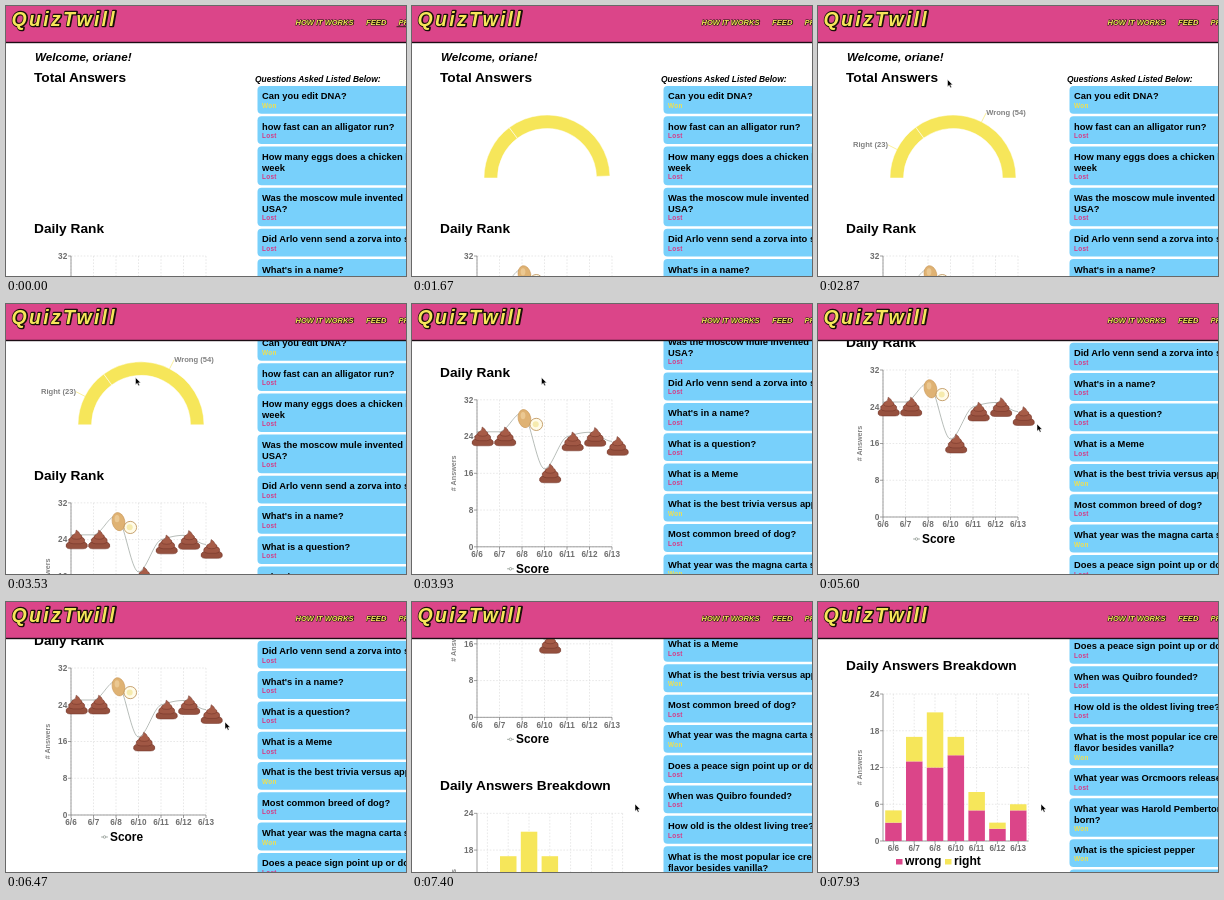
Recreate the animation shown at these times as an HTML page. Size 400 px wide and 270 px high, loop 8 s.

```html
<!DOCTYPE html>
<html lang="en">
<head>
<meta charset="utf-8">
<title>Quiz profile</title>
<style>
  html, body { margin: 0; width: 100%; height: 100%; overflow: hidden; background: #fff; }
  svg { display: block; width: 400px; height: 270px; }
  text { font-family: "Liberation Sans", Arial, sans-serif; font-weight: 700; white-space: pre; }
</style>
</head>
<body>
<svg id="stage" viewBox="0 0 400 270"></svg>
<script>
(() => {
const LOOP = 8000;
const PINK = '#db4589', YELLOW = '#f6e65a', BLUE = '#78d0fb', GRAY = '#707070';
const LINE_DONE = 1470, PIE_START = 370, PIE_TIME = 1500;

const stage = document.getElementById('stage');

function el(parent, tag, attrs = {}, text) {
  const node = document.createElementNS('http://www.w3.org/2000/svg', tag);
  for (const k in attrs) node.setAttribute(k, attrs[k]);
  if (text !== undefined) node.textContent = text;
  return parent.appendChild(node);
}
const label = (parent, x, y, size, text, attrs = {}) =>
  el(parent, 'text', { x, y, 'font-size': size, ...attrs }, text);
const show = (node, on) => node.setAttribute('visibility', on ? 'visible' : 'hidden');

// Monotone cubic through [x, y] keys, held flat at both ends
function track(keys) {
  const d = keys.slice(1).map((k, i) => (k[1] - keys[i][1]) / (k[0] - keys[i][0]));
  const m = keys.map((_, i) => {
    const a = d[i - 1], b = d[i];
    return a * b > 0 ? 2 * a * b / (a + b) : 0;
  });
  return x => {
    if (x <= keys[0][0]) return keys[0][1];
    for (let i = 0; i < d.length; i++) {
      const [x0, y0] = keys[i], [x1, y1] = keys[i + 1];
      if (x > x1) continue;
      const h = x1 - x0, u = (x - x0) / h, v = 1 - u;
      return y0 * (1 + 2 * u) * v * v + y1 * u * u * (3 - 2 * u)
        + h * (m[i] * u * v * v - m[i + 1] * u * u * v);
    }
    return keys[keys.length - 1][1];
  };
}

// CSS "ease" curve
function ease(x) {
  if (x <= 0) return 0;
  if (x >= 1) return 1;
  const bez = (s, a, b) => 3 * a * s * (1 - s) ** 2 + 3 * b * s * s * (1 - s) + s ** 3;
  let lo = 0, hi = 1;
  for (let i = 0; i < 24; i++) {
    const half = (lo + hi) / 2;
    if (bez(half, .25, .25) < x) lo = half; else hi = half;
  }
  return bez(lo, .1, 1);
}

const page = el(stage, 'g');

// Headings
label(page, 29, 55.2, 11.7, 'Welcome, oriane!', { 'font-style': 'italic' });
label(page, 28, 76, 13.7, 'Total Answers');
label(page, 28, 227, 13.7, 'Daily Rank');
label(page, 28, 469.3, 13.7, 'Daily Answers Breakdown');
label(page, 249, 75.6, 8.43, 'Questions Asked Listed Below:', { 'font-style': 'italic' });

// Question cards: text lines, then whether it was won
const cards = [
  ['Can you edit DNA?', 1],
  ['how fast can an alligator run?', 0],
  ['How many eggs does a chicken lay a|week', 0],
  ['Was the moscow mule invented in the|USA?', 0],
  ['Did Arlo venn send a zorva into space?', 0],
  ["What's in a name?", 0],
  ['What is a question?', 0],
  ['What is a Meme', 0],
  ['What is the best trivia versus app?', 1],
  ['Most common breed of dog?', 0],
  ['What year was the magna carta signed?', 1],
  ['Does a peace sign point up or down?', 0],
  ['When was Quibro founded?', 0],
  ['How old is the oldest living tree?', 0],
  ['What is the most popular ice cream|flavor besides vanilla?', 1],
  ['What year was Orcmoors released?', 0],
  ['What year was Harold Pemberton|born?', 1],
  ['What is the spiciest pepper', 1],
  ['', 0]
];
let cardY = 80;
for (const [text, won] of cards) {
  const lines = text.split('|'), extra = (lines.length - 1) * 10.8;
  el(page, 'rect', { x: 251.5, y: cardY, width: 170, height: 27.8 + extra, rx: 4, fill: BLUE });
  lines.forEach((s, i) => label(page, 256, cardY + 13.4 + i * 11, 9.35, s));
  label(page, 256, cardY + 21.9 + extra, 6.4, won ? 'Won' : 'Lost',
    { fill: won ? '#f2e04e' : '#d63a85', 'letter-spacing': .3 });
  cardY += 30.3 + extra;
}

// Half-ring of right and wrong answers
const CX = 135, CY = 172, R_IN = 49.5, R_OUT = 63;
const polar = (r, deg) => {
  const a = deg * Math.PI / 180;
  return [CX + r * Math.cos(a), CY - r * Math.sin(a)];
};
function sector(from, to) {
  const [a, b, c, d] = [polar(R_OUT, from), polar(R_OUT, to), polar(R_IN, to), polar(R_IN, from)];
  return `M${a}A${R_OUT} ${R_OUT} 0 0 1 ${b}L${c}A${R_IN} ${R_IN} 0 0 0 ${d}Z`;
}
const slices = [23, 54].map(n => ({
  sweep: n / 77 * 180,
  node: el(page, 'path', { fill: YELLOW, stroke: '#fff', 'stroke-width': .5 })
}));
const pieLabels = el(page, 'g');
[[153, 'Right (23)', 'end'], [63, 'Wrong (54)', 'start']].forEach(([deg, text, anchor]) => {
  const [x0, y0] = polar(R_OUT, deg), [x, y] = polar(73, deg);
  el(pieLabels, 'path', { d: `M${x0} ${y0}L${x} ${y}`, stroke: YELLOW, 'stroke-width': .6 });
  label(pieLabels, x, y + 2.2, 7.6, text, { fill: '#808080', 'text-anchor': anchor });
});

// Axes shared by both charts
const AXIS = 65, TALL = 147;
function axes(y, max, end, grid, ticks) {
  const dash = { stroke: '#d8d8d8', 'stroke-width': .6, 'stroke-dasharray': '1.6 1.6', fill: 'none' };
  const solid = { stroke: '#777', 'stroke-width': .7, fill: 'none' };
  const bottom = y + TALL;
  for (const x of grid) el(page, 'path', { d: `M${x} ${y}V${bottom}`, ...dash });
  for (let i = 0; i < 5; i++) {
    const ty = y + i * TALL / 4;
    el(page, 'path', { d: `M${AXIS} ${ty}H${end}`, ...dash });
    el(page, 'path', { d: `M${AXIS - 3} ${ty}H${AXIS}`, ...solid });
    label(page, 61.3, ty + 2.9, 8.3, max * (4 - i) / 4, { fill: GRAY, 'text-anchor': 'end' });
  }
  ['6/6', '6/7', '6/8', '6/10', '6/11', '6/12', '6/13'].forEach((s, i) => {
    el(page, 'path', { d: `M${ticks[i]} ${bottom}v3`, ...solid });
    label(page, ticks[i], bottom + 10.2, 8.2, s, { fill: GRAY, 'text-anchor': 'middle' });
  });
  el(page, 'path', { d: `M${AXIS} ${y}V${bottom}H${end}`, ...solid });
  label(page, 0, 0, 7.2, '# Answers', {
    fill: '#858585', 'text-anchor': 'middle',
    transform: `translate(43.5 ${y + TALL / 2}) rotate(-90)`
  });
}

// Daily rank line
const days = [...Array(7).keys()];
const dayX = days.map(i => AXIS + i * 22.5);
axes(250, 32, 200, dayX, dayX);
const rank = [282, 282, 263, 319, 287, 282.5, 291.5];
const rankAt = track(rank.map((y, i) => [dayX[i], y]));
let curve = '';
for (let x = AXIS; x <= 200; x++) curve += `${curve ? 'L' : 'M'}${x} ${rankAt(x).toFixed(2)}`;
const line = el(page, 'path', {
  d: curve, fill: 'none', stroke: '#87918a', 'stroke-width': .6, pathLength: 1
});

const marks = el(page, 'g');
function pile(x, y) {
  const g = el(marks, 'g', { transform: `translate(${x} ${y})` });
  const tier = (d, fill) => el(g, 'path', { d, fill, stroke: '#6f3025', 'stroke-width': .5 });
  tier('M-8 2.5Q-11.5 4-10.5 7.5Q-9.5 9.5-6 9.3H6Q9.5 9.5 10.5 7.5Q11.5 4 8 2.5Z', '#95503e');
  tier('M-5-2.5Q-8.5-1-8 1.8Q-7 4.3-3.5 4.2H4Q7.5 4 8 1.8Q8.5-1 5-2.5Z', '#a05744');
  tier('M-.5-9.5Q2.5-8 3.5-5Q6-4 5-1.8Q3.5-.3 0-.3Q-4-.3-5-1.8Q-5.8-4-3-5Q-.5-6-.5-9.5Z', '#a75c47');
}
function egg(x, y) {
  const g = el(marks, 'g', { transform: `translate(${x} ${y})` });
  el(g, 'ellipse', { rx: 6.3, ry: 9.2, fill: '#dfb273', stroke: '#c99755', 'stroke-width': .6, transform: 'rotate(-12)' });
  el(g, 'ellipse', { cx: -1.5, cy: -3, rx: 2.4, ry: 3.6, fill: '#ebc892' });
  el(g, 'ellipse', { cx: 11.8, cy: 5.8, rx: 6.3, ry: 6.1, fill: '#fffbe8', stroke: '#b98c50', 'stroke-width': .8 });
  el(g, 'circle', { cx: 11.2, cy: 5.6, r: 3, fill: '#f6ebae' });
}
rank.forEach((y, i) => i === 2 ? egg(112.5, 268.8) : pile(dayX[i] + 5.7, y + 4.7));

el(page, 'path', { d: 'M95 419H102', stroke: '#87918a', 'stroke-width': .7 });
el(page, 'circle', { cx: 98.5, cy: 419, r: 1.3, fill: '#fff', stroke: '#87918a', 'stroke-width': .7 });
label(page, 104, 422.8, 11.9, 'Score');

// Stacked daily bars: wrong below, right above
const BAND = 20.8, UNIT = TALL / 24;
const mid = days.map(i => AXIS + (i + .5) * BAND);
axes(493, 24, 210.6, [...mid, 210.6], mid);
const wrong = [3, 13, 12, 14, 5, 2, 5], right = [2, 4, 9, 3, 3, 1, 1];
days.forEach(i => {
  const bar = (from, n, fill) => el(page, 'rect', {
    x: mid[i] - 8.2, y: 640 - (from + n) * UNIT, width: 16.5, height: n * UNIT, fill
  });
  bar(0, wrong[i], PINK);
  bar(wrong[i], right[i], YELLOW);
});
[[78, 'wrong', PINK], [127, 'right', YELLOW]].forEach(([x, text, fill]) => {
  el(page, 'rect', { x, y: 658, width: 6.5, height: 5.5, fill });
  label(page, x + 9, 664, 12.1, text);
});

// Fixed header
el(stage, 'rect', { width: 400, height: 36, fill: PINK });
el(stage, 'rect', { y: 35.8, width: 400, height: 1.4, fill: '#1c0d14' });
const inked = (x, y, size, text, ink, gap) => {
  const base = { 'font-style': 'italic', 'letter-spacing': gap };
  label(stage, x + ink * .25, y + ink * .25, size, text,
    { ...base, fill: '#1a1208', stroke: '#1a1208', 'stroke-width': ink, 'stroke-linejoin': 'round' });
  label(stage, x, y, size, text, { ...base, fill: YELLOW });
};
inked(5.5, 19.8, 19.5, 'QuizTwill', 2.4, 2.3);
inked(289.5, 19, 7.5, 'HOW IT WORKS', 1.1, 0);
inked(360, 19, 7.7, 'FEED', 1.1, 0);
inked(392.5, 19, 7.6, 'PROFILE', 1.1, 0);
const underline = el(stage, 'rect', { x: 390.5, y: 20.2, width: 10, height: 1, fill: '#3a1f1a' });

const pointer = el(stage, 'path', {
  d: 'M0 0V7.2L1.7 5.7L2.9 8.3L4.1 7.8L3 5.3H5.2Z',
  fill: '#000', stroke: '#fff', 'stroke-width': .5
});

const scrollAt = track([[3050, 0], [3530, 51], [4050, 172], [4330, 183], [4650, 184],
  [6650, 184], [7400, 281.5], [7930, 401]]);
const pointX = track([[1950, 405], [2600, 129.5], [4450, 129.5], [5270, 208], [5420, 219], [6500, 219], [7100, 223]]);
const pointY = track([[1950, 20], [2600, 73.5], [4450, 73.5], [5270, 112], [5420, 120], [6500, 120], [7100, 202]]);

function draw(t) {
  page.setAttribute('transform', `translate(0 ${-scrollAt(t)})`);

  const grown = ease((t - PIE_START) / PIE_TIME);
  let angle = 180;
  for (const { sweep, node } of slices) {
    const end = angle - sweep * grown;
    node.setAttribute('d', sector(angle, end));
    show(node, grown > 0);
    angle = end;
  }
  show(pieLabels, grown === 1);

  const drawn = ease((t + 30) / 1500);
  line.setAttribute('stroke-dasharray', drawn < 1 ? `${drawn} 2` : 'none');
  show(marks, t >= LINE_DONE);

  show(underline, t < 70);
  show(pointer, t > 1950);
  pointer.setAttribute('transform', `translate(${pointX(t)} ${pointY(t)})`);
}

const start = performance.now();
function tick() {
  draw((performance.now() - start) % LOOP);
  requestAnimationFrame(tick);
}
tick();
})();
</script>
</body>
</html>
```
